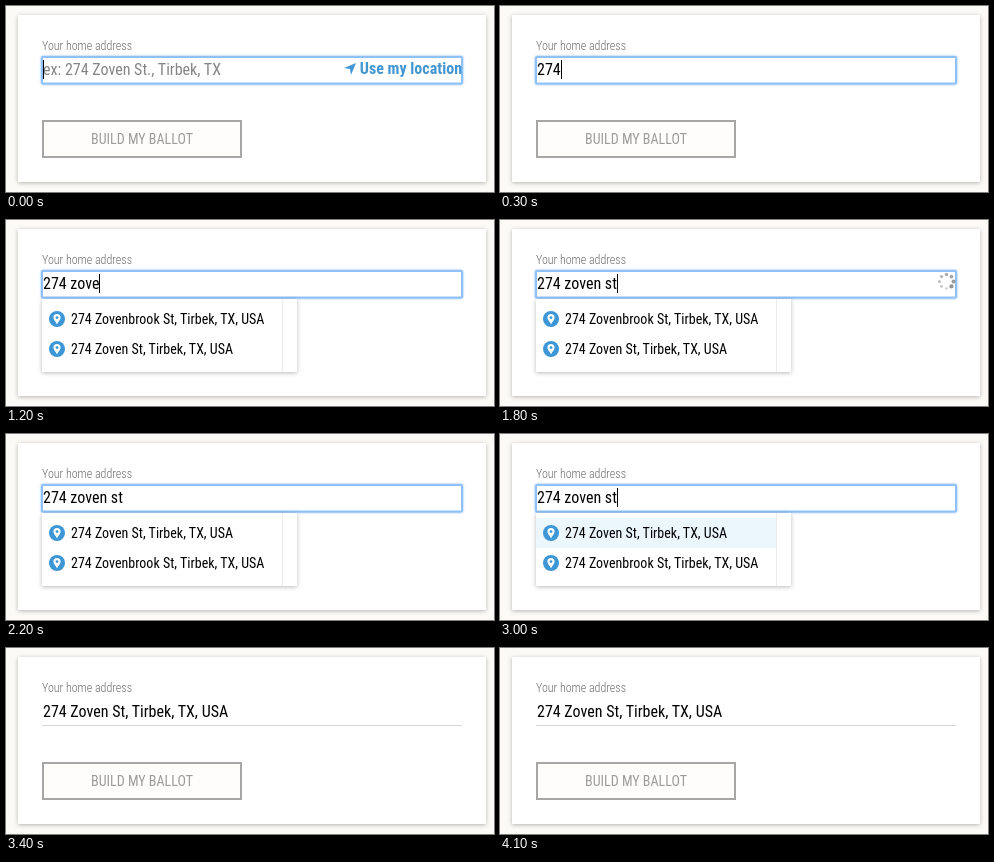
An HTML page for the animation above (4.5 s loop, 488 by 186 pixels).

```html
<!DOCTYPE html>
<html lang="en">
<head>
<meta charset="utf-8">
<title>Address lookup</title>
<style>
  html, body { margin: 0; width: 100%; height: 100%; overflow: hidden; background: #fbfaf6; }
  svg { display: block; width: 100vw; height: 100vh; font-family: "Roboto Condensed", Roboto, sans-serif; font-stretch: 75%; }
  text { white-space: pre; }
  .card { fill: #fff; filter: drop-shadow(0 1px 2px rgba(0, 0, 0, .28)); }
  .label { font-size: 12px; font-weight: 300; fill: #6c6c6c; }
  .field { font-size: 16px; }
  .option { font-size: 14px; }
  .link { font-size: 16px; font-weight: 700; fill: #4296d2; }
  .ring { fill: #fff; stroke: #8fc1f7; stroke-width: 2; filter: drop-shadow(0 0 1px #7db6f5); }
</style>
</head>
<body>
<svg viewBox="0 0 488 186">
  <defs>
    <g id="pin">
      <circle r="8" fill="#3d96d5"/>
      <path d="M0 5.5C-1 3-3.6 1-3.6-1.4a3.6 3.6 0 0 1 7.2 0C3.6 1 1 3 0 5.5z" fill="#fff"/>
      <circle cy="-1.4" r="1.4" fill="#3d96d5"/>
    </g>
  </defs>
  <rect class="card" x="12" y="9" width="468" height="167"/>
  <text class="label" x="36" y="44">Your home address</text>

  <g id="button">
    <rect x="37" y="115" width="198" height="36" fill="#fefdfb" stroke="#a6a6a6" stroke-width="2"/>
    <text id="buttonText" class="option" x="136" y="138" text-anchor="middle" fill="#9c9c9c">BUILD MY BALLOT</text>
  </g>

  <path d="M36 77.5H456" stroke="#d6d6d6"/>
  <rect id="ring" class="ring" x="36" y="51" width="420" height="26.5" rx="1"/>

  <g id="empty">
    <text class="field" x="37" y="69" fill="#858585">ex: 274 Zoven St., Tirbek, TX</text>
    <path d="M350 57 345 69 344 63 338 62z" fill="#4296d2"/>
    <text class="link" x="456" y="68" text-anchor="end">Use my location</text>
  </g>
  <text id="typed" class="field" x="37" y="69"></text>
  <rect id="caret" y="54" width="1" height="19"/>
  <g id="spinner" transform="translate(446.5 61.5)"></g>

  <g id="menu">
    <rect class="card" x="36" y="79" width="255" height="73"/>
    <rect id="hover" x="36" y="84" width="240" height="30" fill="#ebf6fd"/>
    <path d="M276.5 79V152" stroke="#ebebeb"/>
    <use href="#pin" x="51" y="99"/>
    <use href="#pin" x="51" y="129"/>
    <text id="first" class="option" x="65" y="104"></text>
    <text id="second" class="option" x="65" y="134"></text>
  </g>
</svg>
<script>
const LOOP = 4500;
const SHORT = '274 Zoven St, Tirbek, TX, USA';
const LONG = '274 Zovenbrook St, Tirbek, TX, USA';
const QUERY = '274 zoven st';
// Time of each keystroke in QUERY
const KEYS = [100, 200, 300, 500, 600, 700, 900, 1200, 1300, 1500, 1700, 1800];
const DOTS = 8;

const $ = id => document.getElementById(id);
const show = (id, on) => $(id).style.display = on ? '' : 'none';
const within = (t, from, to) => t >= from && t < to;

// Tighten the tracking when only the normal-width face is available
if ($('buttonText').getComputedTextLength() > 109)
  document.querySelector('svg').style.letterSpacing = '-.055em';

const dots = Array.from({ length: DOTS }, (_, i) => {
  const dot = document.createElementNS('http://www.w3.org/2000/svg', 'circle');
  const angle = i / DOTS * 2 * Math.PI;
  dot.setAttribute('cx', 7 * Math.sin(angle));
  dot.setAttribute('cy', -7 * Math.cos(angle));
  $('spinner').append(dot);
  return dot;
});

function drawSpinner(t) {
  const head = 1 + (t - 800) / 100;
  dots.forEach((dot, i) => {
    const age = (((head - i) % DOTS) + DOTS) % DOTS / DOTS;
    dot.setAttribute('r', 2.1 - age * .9);
    dot.setAttribute('fill', `rgba(90, 90, 90, ${.65 - age * .4})`);
  });
}

function draw(now) {
  const t = Math.floor(now % LOOP / 100) * 100;
  const focused = t < 3200;
  const chosen = t >= 3400;
  const open = within(t, 1100, 3400);
  const count = KEYS.filter(key => key <= t).length;
  const sorted = t >= 2100;

  $('typed').textContent = chosen ? SHORT : QUERY.slice(0, count);
  $('first').textContent = sorted ? SHORT : LONG;
  $('second').textContent = sorted ? LONG : SHORT;
  $('caret').setAttribute('x', 37 + (count ? Math.round($('typed').getComputedTextLength()) : 0));

  show('empty', count === 0);
  show('ring', focused);
  show('caret', focused && !within(t, 2200, 2500));
  show('menu', open);
  show('hover', t >= 3000);
  show('button', !open);
  show('spinner', within(t, 500, 1100) || within(t, 1400, 2100));
  drawSpinner(t);
}

const start = performance.now();
function tick() {
  draw(performance.now() - start);
  requestAnimationFrame(tick);
}
tick();
</script>
</body>
</html>
```
